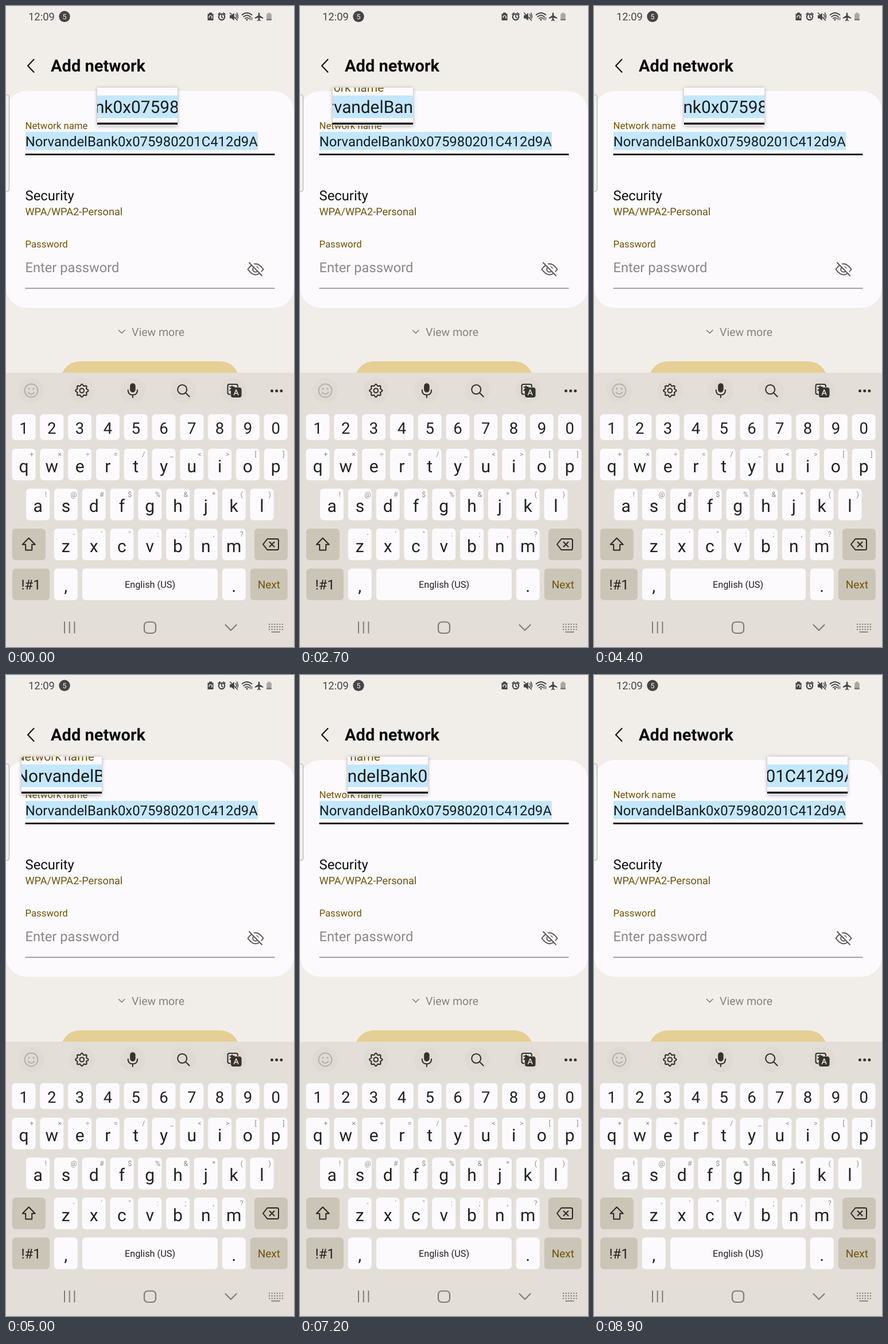
An HTML page for the animation above (9 s loop, 502x1115 px).

```html
<!DOCTYPE html>
<html lang="en">
<head>
<meta charset="utf-8">
<title>Add network</title>
<style>
  html, body { margin: 0; width: 100%; height: 100%; overflow: hidden; background: #f1eeea; }
  svg { display: block; font-family: Roboto, sans-serif; text-rendering: geometricPrecision; }
  .line { fill: none; stroke-linecap: round; stroke-linejoin: round; }
  .mid { text-anchor: middle; }
  .olive { fill: #6d5407; }
  #frame { filter: drop-shadow(0 1px 3px rgba(0, 0, 0, .32)); }
</style>
</head>
<body>
<svg id="stage" width="502" height="1115" viewBox="0 0 502 1115">
  <rect width="502" height="1115" fill="#f1eeea"/>

  <!-- status bar -->
  <g fill="#454545">
    <text x="39" y="24.5" font-size="18.4">12:09</text>
    <circle cx="102" cy="18.3" r="9.7"/>
    <text class="mid" x="102" y="22.8" font-size="12.5" fill="#f5f3f0">5</text>
    <path d="M354 11.5h5v2h2.5v11.5h-10v-11.5h2.5z"/>
    <path class="line" d="M354.2 20a2.6 2.6 0 1 1 4.3 1.2" stroke="#f1eeea" stroke-width="1.4"/>
    <circle cx="376" cy="19" r="5.2" fill="none" stroke="#454545" stroke-width="2.2"/>
    <path class="line" d="M370 14.5l3-2.5M382 14.5l-3-2.5M376 16v3.4l2 1.2" stroke="#454545" stroke-width="1.8"/>
    <path d="M390 16h3.2l4.6-4v13.5l-4.6-4H390z"/>
    <path class="line" d="M390.5 12l13 13M400.5 14.5q2 3 .5 6M402.5 12q3 6 1 10" stroke="#454545" stroke-width="1.6"/>
    <g class="line" stroke="#454545" stroke-width="1.8">
      <path d="M411.5 15.5q8.5-7 17 0M414 18.7q6-5 12 0M416.8 21.7q3.2-2.6 6.4 0"/>
      <path d="M425.5 24v-4M428.5 20v4" stroke-width="1.3"/>
    </g>
    <circle cx="420" cy="24" r="1.5"/>
    <path d="M439.7 12.5q1.3-2 2.6 0v4l6 3.8v1.8l-6-1.9v3.5l1.8 1.3v1.2l-3.1-.9-3.1.9V25l1.8-1.3v-3.5l-6 1.9v-1.8l6-3.8z"/>
    <path d="M456.5 11.5h4v2h2.3V25h-8.6V13.5h2.3z" fill="#a9a7a4"/>
    <path d="M454.2 22.5h8.6V25h-8.6z" fill="#777"/>
  </g>

  <!-- header -->
  <path class="line" d="M48.5 93L38 104l10.5 11" stroke="#151515" stroke-width="2.2"/>
  <text x="78" y="114" font-size="29" font-weight="600" fill="#0b0b0b">Add network</text>

  <!-- form -->
  <g id="form">
    <rect y="148" width="502" height="377" rx="36" fill="#fcfafd"/>
    <text class="olive" x="33.5" y="214" font-size="16.8">Network name</text>
    <rect x="34" y="219" width="405" height="31.5" fill="#c4e7fb"/>
    <text x="33.7" y="243.5" font-size="23.84" fill="#171b1e">NorvandelBank0x075980201C412d9A</text>
    <rect x="33.5" y="256.8" width="435" height="2.8" fill="#0b0b0b"/>
  </g>
  <text x="33.5" y="338" font-size="23.8" fill="#0f0f0f">Security</text>
  <text class="olive" x="33.5" y="363.7" font-size="18.1">WPA/WPA2-Personal</text>
  <text class="olive" x="33.5" y="420.3" font-size="16.8">Password</text>
  <text x="33.5" y="463" font-size="23.7" fill="#8a8886">Enter password</text>
  <rect x="33.5" y="490.4" width="435" height="1.2" fill="#6b6967"/>
  <g class="line" stroke="#5c5a58" stroke-width="2">
    <path d="M421.5 458q13.5-19 27 0q-13.5 19-27 0z"/>
    <circle cx="435" cy="458" r="4.8"/>
    <path d="M425.5 445.5l22 23" stroke="#fcfafd" stroke-width="5"/>
    <path d="M424 446.5l22 22.5"/>
  </g>
  <path d="M0 154.5h2q3.5 0 3.5 5v158q0 5-3.5 5H0" fill="#f3f1f0" stroke="#b5b3b1" stroke-width="1.2"/>
  <path class="line" d="M196.5 564l5.2 5.2 5.2-5.2" stroke="#858380" stroke-width="1.7"/>
  <text x="219" y="574.3" font-size="19.5" fill="#858380">View more</text>
  <rect x="95" y="618" width="312" height="68" rx="34" fill="#e5cf94"/>

  <!-- keyboard -->
  <rect y="638" width="502" height="477" fill="#e3dfd8"/>
  <g id="tools"></g>
  <g class="line" stroke="#b5b1aa" stroke-width="2">
    <circle cx="44" cy="669" r="11.5"/>
    <path d="M38.5 672q5.5 6.5 11 0"/>
    <path d="M40 665.5v.4M48 665.5v.4" stroke-width="3"/>
  </g>
  <g class="line" stroke="#343330" stroke-width="2.1">
    <path id="gear"/>
    <circle cx="132.3" cy="669" r="3.8"/>
    <rect x="217.2" y="657.2" width="7.4" height="14" rx="3.7" fill="#343330"/>
    <path d="M212.7 668q0 8.5 8.2 8.5t8.2-8.5M220.9 677v4"/>
    <circle cx="307.2" cy="667" r="8"/>
    <path d="M313.2 673l6.5 6.5"/>
    <path d="M390.5 675.5h-1q-3 0-3-3v-11.500q0-3 3-3h11.500q3 0 3 3v1M390.500 663h7M394 661v2q-.5 4-3.500 5.500"/>
    <rect x="393" y="664.500" width="16.500" height="15.500" rx="3" fill="#343330"/>
    <path d="M397.500 676.500l3.700-9 3.700 9M398.800 673.800h4.800" stroke="#e9e5de" stroke-width="1.600"/>
  </g>
  <g fill="#343330">
    <circle cx="463.500" cy="669.500" r="2.500"/><circle cx="471.700" cy="669.500" r="2.500"/><circle cx="479.900" cy="669.500" r="2.500"/>
  </g>
  <g id="keys"></g>
  <g class="line" stroke="#282724" stroke-width="2">
    <path d="M39.700 925.500l11 11.200h-5.500v9.800h-11v-9.800h-5.500z"/>
    <path d="M455.500 927h17q2.500 0 2.500 2.500v14q0 2.500-2.500 2.500h-17l-7.500-9.500zM459.500 932.500l8 8M467.500 932.500l-8 8"/>
  </g>

  <!-- navigation bar -->
  <g class="line" stroke="#807d78" stroke-width="2.200">
    <path d="M102 1071.500v19M110.700 1071.500v19M119.400 1071.500v19" stroke-width="2"/>
    <rect x="241" y="1071.500" width="20" height="19.500" rx="6"/>
    <path d="M382.500 1076.500l9.500 9.500 9.500-9.500"/>
    <path d="M458 1075.500h25M458 1080h25M458 1084.500h25" stroke-width="2" stroke-linecap="butt" stroke-dasharray="2.200 2.350" style="stroke-linecap:butt"/>
    <path d="M463 1088.800h14" stroke-width="1.800"/>
  </g>

  <!-- magnifier: a 1.25x view of the form -->
  <rect id="frame" y="142" width="140" height="66" rx="2" fill="#fcfafd"/>
  <svg id="lens" y="142" width="140" height="66"><use href="#form"/></svg>
</svg>
<script>
const $ = id => document.getElementById(id);
const PITCH = 48.8;

function add(parent, tag, attrs, text = "") {
  const node = document.createElementNS("http://www.w3.org/2000/svg", tag);
  for (const name in attrs) node.setAttribute(name, attrs[name]);
  node.textContent = text;
  parent.append(node);
}

function key(cx, y, width, height, label = "", size = 30, baseline = 0, fill = "#fcfafd", color = "#22211f") {
  add($("keys"), "rect", { x: cx - width / 2, y, width, height, rx: 6, fill });
  add($("keys"), "text", { class: "mid", x: cx, y: baseline, "font-size": size, fill: color }, label);
}

function row(letters, hints, firstX, y, height, size, baseline) {
  [...letters].forEach((letter, i) => {
    const cx = firstX + i * PITCH;
    key(cx, y, 41, height, letter, size, baseline);
    if (hints[i]) {
      add($("keys"), "text",
        { class: "mid", x: cx + 13.7, y: y + 14, "font-size": 12.5, fill: "#908d87" }, hints[i]);
    }
  });
}

const SPECIAL = "#cbc5b8";
row("1234567890", "", 31, 710, 45, 27.5, 743.7);
row("qwertyuiop", "+×÷=/_<>[]", 31, 770, 55, 30, 810.5);
row("asdfghjkl", "!@#$%&*()", 55.6, 839.5, 55, 30, 880);
row("zxcvbnm", "-'\":;,?", 104.3, 909, 55, 30, 949.5);
key(39.8, 909, 58, 55, "", 30, 0, SPECIAL);
key(462, 909, 58, 55, "", 30, 0, SPECIAL);
key(43.5, 978.5, 65, 55, "!#1", 23.8, 1014.5, SPECIAL);
key(104.3, 978.5, 41, 55, ",", 30, 1019);
key(251, 978.5, 236, 55, "English (US)", 16.3, 1012);
key(397.3, 978.5, 41, 55, ".", 30, 1019);
key(458.3, 978.5, 65, 55, "Next", 19, 1013, SPECIAL, "#6d5407");

for (let i = 0; i < 5; i++) {
  add($("tools"), "circle", { cx: 44 + i * 88.4, cy: 669, r: 22, fill: "#dfdad3" });
}

const gearPoints = Array.from({ length: 64 }, (_, i) => {
  const angle = i * Math.PI / 32, r = 9.8 + 1.4 * Math.cos(8 * angle);
  return `${132.3 + r * Math.sin(angle)} ${669 - r * Math.cos(angle)}`;
});
$("gear").setAttribute("d", `M${gearPoints.join("L")}Z`);

// Left edge of the magnifier: [time in ms, x]
const DRAG = [
  [0, 159], [500, 80], [1000, 19], [1700, 19], [2700, 57], [3800, 197], [4150, 235],
  [4700, 64], [5000, 27], [5200, 19], [5700, 75], [6200, 19], [6300, 19], [6700, 55],
  [7700, 110], [8100, 176], [8700, 298], [8900, 302]
];

function lensX(time) {
  const next = DRAG.findIndex(([t]) => t >= time);
  if (next < 1) return DRAG[0][1];
  const [t0, x0] = DRAG[next - 1], [t1, x1] = DRAG[next];
  return x0 + (x1 - x0) * (time - t0) / (t1 - t0);
}

function draw(now) {
  const time = Math.floor(now % 9000 / 100) * 100;
  const x = Math.round(lensX(time));
  $("frame").setAttribute("x", x);
  $("lens").setAttribute("x", x);
  $("lens").setAttribute("viewBox", `${x + 14} 208.1 112 52.8`);
  requestAnimationFrame(draw);
}
draw(performance.now());
</script>
</body>
</html>
```
